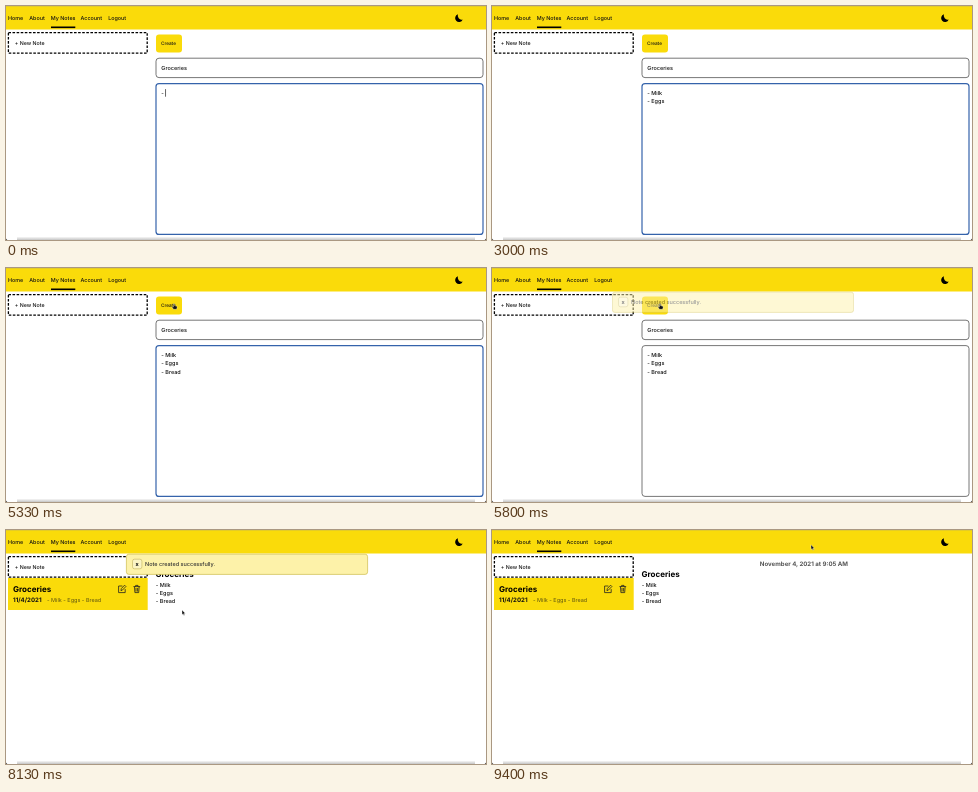
An HTML page that plays this animation: 480x234 px, repeating every 9470 ms.

```html
<!DOCTYPE html>
<html lang="en">
<head>
<meta charset="utf-8">
<title>Notes</title>
<style>
  html, body { margin: 0; width: 100%; height: 100%; overflow: hidden; background: #fff; }
  svg { display: block; width: 100vw; height: 100vh; }
  text { font: 500 5.5px Inter, "Open Sans", sans-serif; white-space: pre; text-rendering: geometricPrecision; fill: #111; }
  .nav { font-size: 5.4px; }
  .heading { font-size: 8px; font-weight: 700; fill: #000; }
  .date { font-size: 6.1px; font-weight: 700; }
  .soft { fill: #5e5510; font-weight: 400; }
  .yellow { fill: #fadb0a; }
  .field { fill: #fff; stroke: #555; stroke-width: .8; }
  .field.focus { stroke: #3563ab; stroke-width: 1.2; }
  .icon { fill: none; stroke: #222; stroke-width: .8; stroke-linejoin: round; stroke-linecap: round; }
  .pointer { fill: #111; stroke: #fff; stroke-width: .35; }
</style>
</head>
<body>
<svg viewBox="0 0 480 234">
  <defs>
    <linearGradient id="shade" x2="0" y2="1">
      <stop stop-color="#fff"/><stop offset="1" stop-color="#c4c4c4"/>
    </linearGradient>
  </defs>

  <rect class="yellow" width="480" height="23.5"/>
  <path d="M0 .2H480" stroke="#b9ad62" stroke-width=".5"/>
  <g id="nav"></g>
  <path d="M45 21.3H69.3" stroke="#000" stroke-width="1.6"/>
  <path d="M452 8.3A3.9 3.9 0 1 0 456.7 13.4A3.8 3.8 0 0 1 452 8.3Z"/>

  <rect x="2.4" y="26.6" width="138.8" height="20.5" fill="#fff" stroke="#000" stroke-width="1.3" stroke-dasharray="2.6 1.5"/>
  <text x="8.8" y="39" style="font-size:5.3px">+ New Note</text>

  <g id="form">
    <rect class="yellow" x="150" y="28.5" width="26" height="18" rx="3"/>
    <text x="155" y="39.2" style="font-size:4.7px">Create</text>
    <rect class="field" x="150" y="52.2" width="327" height="19.4" rx="3"/>
    <text x="155.3" y="63.7">Groceries</text>
    <rect class="field" id="area" x="150" y="77.6" width="327" height="150.8" rx="3"/>
    <g id="typed"></g>
    <rect id="caret" width=".6" height="7.6"/>
  </g>

  <g id="saved">
    <rect class="yellow" x="2" y="48" width="139.7" height="32"/>
    <text class="heading" x="7" y="62">Groceries</text>
    <text class="date" x="7" y="72">11/4/2021</text>
    <text class="soft" x="41" y="71.8">- Milk - Eggs - Bread</text>
    <path class="icon" d="M116 56H112.6V62.6H119.2V59.5M115 60.2L115.3 58.6 118.6 55.2 119.9 56.5 116.6 59.9Z"/>
    <path class="icon" d="M127.8 56.6H133.8M129.6 56.4V55.4H132V56.4M128.5 57L128.9 62.6H132.7L133.1 57M130 58.4V61.2M131.6 58.4V61.2"/>
    <text class="date" x="267.8" y="36.1" style="fill:#555">November 4, 2021 at 9:05 AM</text>
    <text class="heading" x="149.5" y="47.4">Groceries</text>
    <g id="body"></g>
  </g>

  <g id="toast">
    <rect x="120.4" y="24.2" width="241.2" height="20.2" rx="2.5" fill="#fdf2a9" stroke="#cfbd50" stroke-width=".7"/>
    <rect id="close" x="126.5" y="29.2" width="9.4" height="9.6" rx="2" stroke="#b5a54c" stroke-width=".5"/>
    <text x="129.4" y="35.8" style="font-weight:700">x</text>
    <text x="139" y="35.6" style="fill:#333">Note created successfully.</text>
  </g>

  <rect x="11" y="230.5" width="458" height="3.5" fill="url(#shade)"/>
  <path d="M0 232.6V234H1.4Q.2 233.8 0 232.6ZM480 232.6V234H478.6Q479.8 233.8 480 232.6Z"/>

  <g id="mouse">
    <path class="pointer" id="arrow" d="M0 0V4.8L1.1 3.8 1.9 5.5 2.7 5.1 1.9 3.5H3.4Z"/>
    <path class="pointer" id="hand" d="M-.6 .4Q0 -.4 .6 .4V2.2L2.7 2.7Q3.3 3 3.1 4L2.6 5.8H-.5L-2 3.6Q-1.7 2.8-.6 3.6Z"/>
    <path class="icon" id="beam" stroke-width=".6" d="M-.9 -2.5Q0 -2.5 0 -1.9Q0 -2.5 .9 -2.5M0 -1.9V1.9M-.9 2.5Q0 2.5 0 1.9Q0 2.5 .9 2.5"/>
  </g>
</svg>
<script>
const LOOP = 9470, STEP = 1000 / 15;
const NOTE = "- Milk\n- Eggs\n- Bread", LINE = 8.45;
// Press times of every character after the first "- "
const KEYS = [70, 270, 600, 730, 930, 1470, 1800, 1930, 2130, 2270, 2330, 2530,
  3130, 3200, 3400, 3530, 3530, 3600, 3800];
// Pointer moves: start, end, destination, shape once there
const MOVES = [
  [4133, 4530, 184, 25.5, "arrow"],
  [4733, 5130, 168.5, 36, "hand"],
  [5200, 5330, 168, 35.5, "hand"],
  [5930, 5931, 168, 38, "beam"],
  [6733, 7130, 176, 80, "arrow"],
  [8267, 8870, 131.8, 36, "hand"],
  [9200, 9400, 319, 14.8, "arrow"]
];

const $ = id => document.getElementById(id);
const show = (id, on) => { $(id).style.display = on ? "" : "none"; };
const clamp = v => Math.max(0, Math.min(1, v));
const ease = v => v * v * (3 - 2 * v);
const within = (t, a, b) => t >= a && t < b;

function addText(parent, x, y, content, className = "") {
  const node = document.createElementNS("http://www.w3.org/2000/svg", "text");
  node.setAttribute("x", x);
  node.setAttribute("y", y);
  node.setAttribute("class", className);
  node.textContent = content;
  $(parent).append(node);
  return node;
}

[["Home", 2], ["About", 23.3], ["My Notes", 44.8], ["Account", 74.5], ["Logout", 102.2]]
  .forEach(([label, x]) => addText("nav", x, 13.8, label, "nav"));
NOTE.split("\n").forEach((line, i) => addText("body", 149.8, 56.5 + i * LINE, line));
const lines = [0, 1, 2].map(i => addText("typed", 155.3, 88.8 + i * LINE, ""));

function drawTyping(t) {
  const parts = NOTE.slice(0, 2 + KEYS.filter(k => k <= t).length).split("\n");
  lines.forEach((line, i) => { line.textContent = parts[i] || ""; });
  const row = parts.length - 1;
  const width = parts[row] ? lines[row].getComputedTextLength() : 0;
  $("caret").setAttribute("x", 155.4 + width);
  $("caret").setAttribute("y", 83.1 + row * LINE);
  show("caret", within(t, 0, 3000) || within(t, 3130, 4270) || within(t, 4800, 5270));
  $("area").classList.toggle("focus", t < 5730);
}

function drawMouse(t, tick) {
  let x = 225, y = 84, shape = "beam";
  for (const [start, end, toX, toY, rest] of MOVES) {
    if (tick < start) break;
    const p = ease(clamp((tick - start) / (end - start - 3)));
    x += (toX - x) * p;
    y += (toY - y) * p;
    shape = p < 1 ? "arrow" : rest;
  }
  if (t < 4600 && y > 78) shape = "beam";
  show("mouse", t >= 4200);
  ["arrow", "hand", "beam"].forEach(s => show(s, s === shape));
  $("mouse").setAttribute("transform", `translate(${x} ${y})`);
}

function draw(now) {
  const t = now % LOOP;
  const tick = Math.floor((t + 5) / STEP) * STEP;
  const saved = t >= 5930;
  show("form", !saved);
  show("saved", saved);
  if (!saved) drawTyping(t);
  show("toast", within(t, 5730, 9070));
  $("toast").style.opacity = clamp((tick - 5667) / 267);
  $("close").setAttribute("fill", t >= 8800 ? "#fffbe0" : "#fbf4c4");
  drawMouse(t, tick);
}

const begin = performance.now();
function loop() {
  draw(performance.now() - begin);
  requestAnimationFrame(loop);
}
loop();
</script>
</body>
</html>
```
